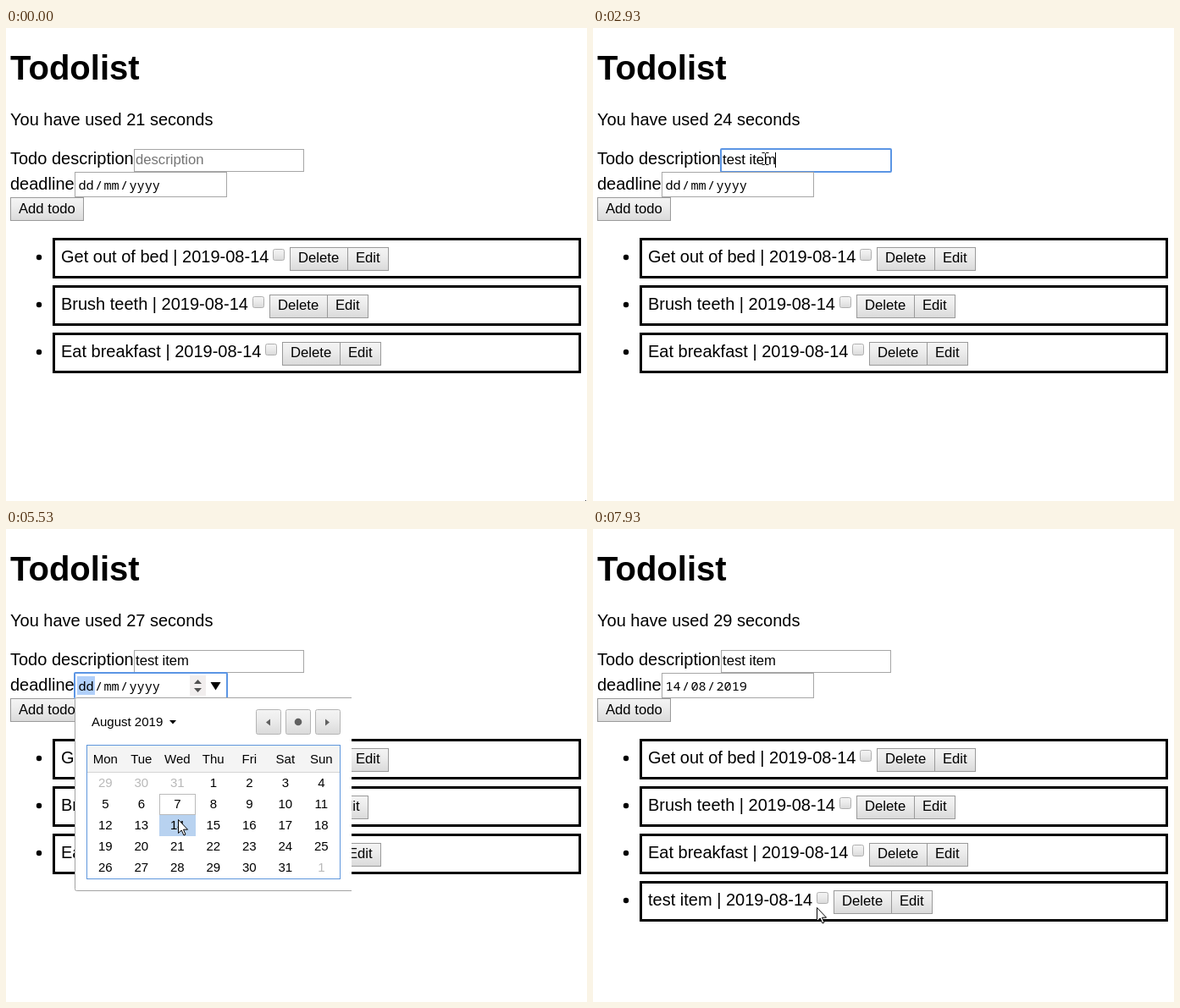
Recreate the animation shown at these times as an HTML page. Size 686x559 px, loop 8 s.

```html
<!DOCTYPE html>
<html lang="en">
<head>
<meta charset="utf-8">
<title>Todolist</title>
<style>
  html, body { margin: 0; height: 100%; overflow: hidden; background: #fff; }
  svg { display: block; width: 100vw; height: 100vh; font: 20px "Liberation Sans", Arial, sans-serif; }
  text { white-space: pre; }
  .field { font-size: 16.667px; }
  .small { font-size: 15px; }
  .mono { font: 15.28px "Noto Sans Mono", monospace; }
  .mid { text-anchor: middle; }
  .button rect { fill: url(#face); stroke: #9a9a9a; }
  .button.hover rect { stroke: #707070; }
  .ring { fill: none; stroke: #5b95e4; stroke-width: 2; }
</style>
</head>
<body>
<svg id="stage" viewBox="0 0 686 559"></svg>
<script>
const LOOP = 8000, STEP = 200 / 3;

const text = (x, y, s, cls = '', more = '') => `<text x="${x}" y="${y}" class="${cls}" ${more}>${s}</text>`;
// Outer bounds x, y, w, h with a one pixel line inside.
const rect = (x, y, w, h, more = '') =>
  `<rect x="${x + .5}" y="${y + .5}" width="${w - 1}" height="${h - 1}" ${more}/>`;
const block = (x, y, w, h, fill, more = '') =>
  `<rect x="${x}" y="${y}" width="${w}" height="${h}" fill="${fill}" ${more}/>`;
const shape = (d, fill) => `<path d="${d}" fill="${fill}"/>`;

const buttons = [];
function button(x, y, w, h, label, base) {
  buttons.push([x, y, w, h]);
  return `<g class="button">${rect(x, y, w, h)}${text(x + 10, base, label, 'field')}</g>`;
}

const items = [['Get out of bed', 335], ['Brush teeth', 311], ['Eat breakfast', 326], ['test item', 284]];
const item = ([name, x], i) => `<g id="item${i}" transform="translate(0 ${0})">
  <circle cx="39" cy="${271 + 56 * i}" r="3.2"/>
  <rect x="56.5" y="${249.5 + 56 * i}" width="621" height="45" fill="none" stroke="#000" stroke-width="3"/>
  ${text(65, 277 + 56 * i, name + ' | 2019-08-14')}
  ${rect(x - 20, 261 + 56 * i, 14, 14, 'rx="2" fill="url(#face)" stroke="#b0b0b0"')}
  ${button(x, 259 + 56 * i, 69, 28, 'Delete', 277 + 56 * i)}
  ${button(x + 68, 259 + 56 * i, 49, 28, 'Edit', 277 + 56 * i)}</g>`;

function calendar() {
  const col = i => 117.3 + 42.5 * i;
  let s = block(81, 199, 327, 229, '#fff', 'rx="2"') +
    '<path d="M408 199.5H83.5q-2 0-2 2V425.5q0 2 2 2H408" fill="none" stroke="#a3a3a3"/>' +
    text(101, 233, 'August 2019', 'small') + shape('M193 226h8l-4 4.5z', '#000');
  for (const x of [295, 330, 365])
    s += rect(x, 213, 30, 30, 'rx="2" fill="url(#face)" stroke="#b4b4b4"');
  s += shape('M312 224.5v8l-5-4z', '#606060') + shape('M377 224.5v8l5-4z', '#606060') +
    '<circle cx="345" cy="228" r="4.3" fill="#606060"/>' +
    block(95, 255, 300, 33, '#f4f4f4') + block(95, 287, 300, 1, '#d4d4d4') +
    rect(95, 255, 300, 159, 'fill="none" stroke="#5f97dc"') +
    '<rect id="cell" width="43" height="25" fill="#b8d2f0"/>' +
    rect(181, 313, 43, 25, 'fill="none" stroke="#bbb"');
  ['Mon', 'Tue', 'Wed', 'Thu', 'Fri', 'Sat', 'Sun'].forEach((d, i) => s += text(col(i), 277, d, 'small mid'));
  for (let i = 0; i < 35; i++) {
    const day = i - 2, off = day < 1 || day > 31;
    s += text(col(i % 7), 305 + 25 * Math.floor(i / 7), day < 1 ? day + 31 : off ? day - 31 : day,
      'small mid', off ? 'fill="#b9b9b9"' : '');
  }
  return s;
}

stage.innerHTML = `
  <defs><linearGradient id="face" x2="0" y2="1">
    <stop stop-color="#f4f4f4"/><stop offset=".38" stop-color="#ededed"/><stop offset="1" stop-color="#dadada"/>
  </linearGradient></defs>
  ${text(5, 61, 'Todolist', '', 'font-size="40" font-weight="bold"')}
  ${text(5, 115, '', '', 'id="counter"')}
  ${text(5, 161, 'Todo description')}
  ${rect(151, 143, 201, 27, 'fill="#fff" stroke="#a6a6a6"')}
  <rect id="textRing" class="ring" x="151" y="143" width="201" height="27" rx="1"/>
  ${text(153, 161, '', 'field', 'id="entry"')}
  <rect id="caret" y="147" width="1" height="18"/>
  ${text(5, 191, 'deadline')}
  ${rect(81, 170, 180, 30, 'fill="#fff" stroke="#a6a6a6"')}
  ${button(5, 200, 87, 28, 'Add todo', 219)}
  <g id="dateFocus">
    <rect class="ring" x="81" y="170" width="180" height="30" rx="1"/>
    ${block(84, 174, 21, 22, '#b1d0fa')}
  </g>
  <g id="spinner">
    ${block(217, 173, 19, 24, '#f1eeee')}
    ${block(240, 177, 17, 16, '#f1eeee', 'id="dropHover"')}
    ${shape('M222 183h9l-4.5-5zM222 188h9l-4.5 5z', '#505050')}
    ${shape('M241.500 181h12l-6 9.500z', '#000')}
  </g>
  ${[85.4, 105, 115.4, 135, 145.4].map(x => text(x, 191, '', 'mono part')).join('')}
  ${items.map(item).join('')}
  <g id="popup">${calendar()}</g>
  <g id="mouse">
    <path id="arrow" d="M.5.5V16.500L4.200 13 7 19 9 18 6.500 12.200H11.500z" fill="#fff" stroke="#000"/>
    <path id="beam" d="M-4-7h3l1 1 1-1h3M0-6V6M-4 7h3l1-1 1 1h3" fill="none" stroke="#000"/>
  </g>`;

const $ = id => document.getElementById(id);
const show = (id, on) => $(id).style.display = on ? '' : 'none';
const buttonNodes = [...document.querySelectorAll('.button')];
// The list buttons are created before "Add todo" only in markup order, so pair boxes with nodes by order.
const parts = [...document.querySelectorAll('.part')];

const linear = u => u, smooth = u => u * u * (3 - 2 * u), glide = u => 1 - (1 - u) ** 1.5;
// Pointer stops: time, x, y, easing on the way there.
const stops = [
  [0, 684, 558], [933, 200, 154, glide], [1067, 203, 154, linear], [3333, 203, 154],
  [4200, 241, 184, smooth], [4333, 249, 183, linear], [4733, 249, 183],
  [5533, 203, 343, smooth], [5600, 203, 343], [6333, 59, 213, smooth], [6933, 59, 213],
  [7133, 161, 352, smooth], [7333, 161, 352], [7533, 154, 372, smooth], [7933, 264, 447, smooth]
];
function pointer(t) {
  const i = stops.findIndex(s => s[0] > t);
  if (i < 0) return stops[stops.length - 1].slice(1, 3);
  const [t0, x0, y0] = stops[i - 1], [t1, x1, y1, ease = linear] = stops[i];
  const u = ease((t - t0) / (t1 - t0));
  return [x0 + (x1 - x0) * u, y0 + (y1 - y0) * u].map(Math.round);
}

const typed = 'test item';
// Moment of each key press, the first being the click into the field.
const keys = [1070, 1670, 1730, 2000, 2070, 2400, 2530, 2670, 2800, 2930];

function draw(ms) {
  const t = Math.floor((ms + 5) / STEP) * STEP, now = t + 5;
  const [x, y] = pointer(t);
  const within = ([bx, by, w, h]) => x >= bx && x < bx + w && y >= by && y < by + h;
  const open = now >= 4600 && now < 5600;
  const added = now >= 6470;

  $('counter').textContent = `You have used ${21 + Math.floor((now + 600) / 1000)} seconds`;

  const pressed = keys.filter(k => k <= now).length;
  const value = typed.slice(0, Math.max(0, pressed - 1));
  const inText = now >= 1070 && now < 4330;
  const entry = $('entry');
  entry.textContent = value || 'description';
  entry.setAttribute('fill', value ? '#000' : '#757575');
  show('textRing', inText);
  show('caret', inText && Math.floor((now - keys[pressed - 1]) / 500) % 2 === 0);
  $('caret').setAttribute('x', Math.floor(153 + (value ? entry.getComputedTextLength() : 0)));

  const inDate = now >= 4330 && now < 6400;
  const overDate = !open && within([81, 170, 180, 30]);
  show('dateFocus', inDate);
  show('spinner', inDate || overDate);
  show('dropHover', overDate && x > 238);
  (now < 5600 ? 'dd / mm / yyyy' : '14 / 08 / 2019').split(' ').forEach((s, i) => parts[i].textContent = s);

  show('item3', added);
  buttonNodes.forEach((b, i) => b.classList.toggle('hover', !open && within(buttons[i])));

  show('popup', open);
  const c = Math.floor((x - 96) / 42.5), r = Math.floor((y - 288) / 25);
  show('cell', c >= 0 && c < 7 && r >= 0 && r < 5);
  $('cell').setAttribute('x', Math.round(96 + 42.5 * c));
  $('cell').setAttribute('y', 288 + 25 * r);

  const overText = !open && (within([151, 143, 201, 27]) ||
    items.some(([, end], i) => (i < 3 || added) && within([65, 259 + 56 * i, end - 90, 23])));
  show('arrow', !overText);
  show('beam', overText);
  $('mouse').setAttribute('transform', `translate(${overText ? x + .5 : x} ${overText ? y + .5 : y})`);
}

function tick(ms) {
  draw(ms % LOOP);
  requestAnimationFrame(tick);
}
draw(0);
requestAnimationFrame(tick);
</script>
</body>
</html>
```
